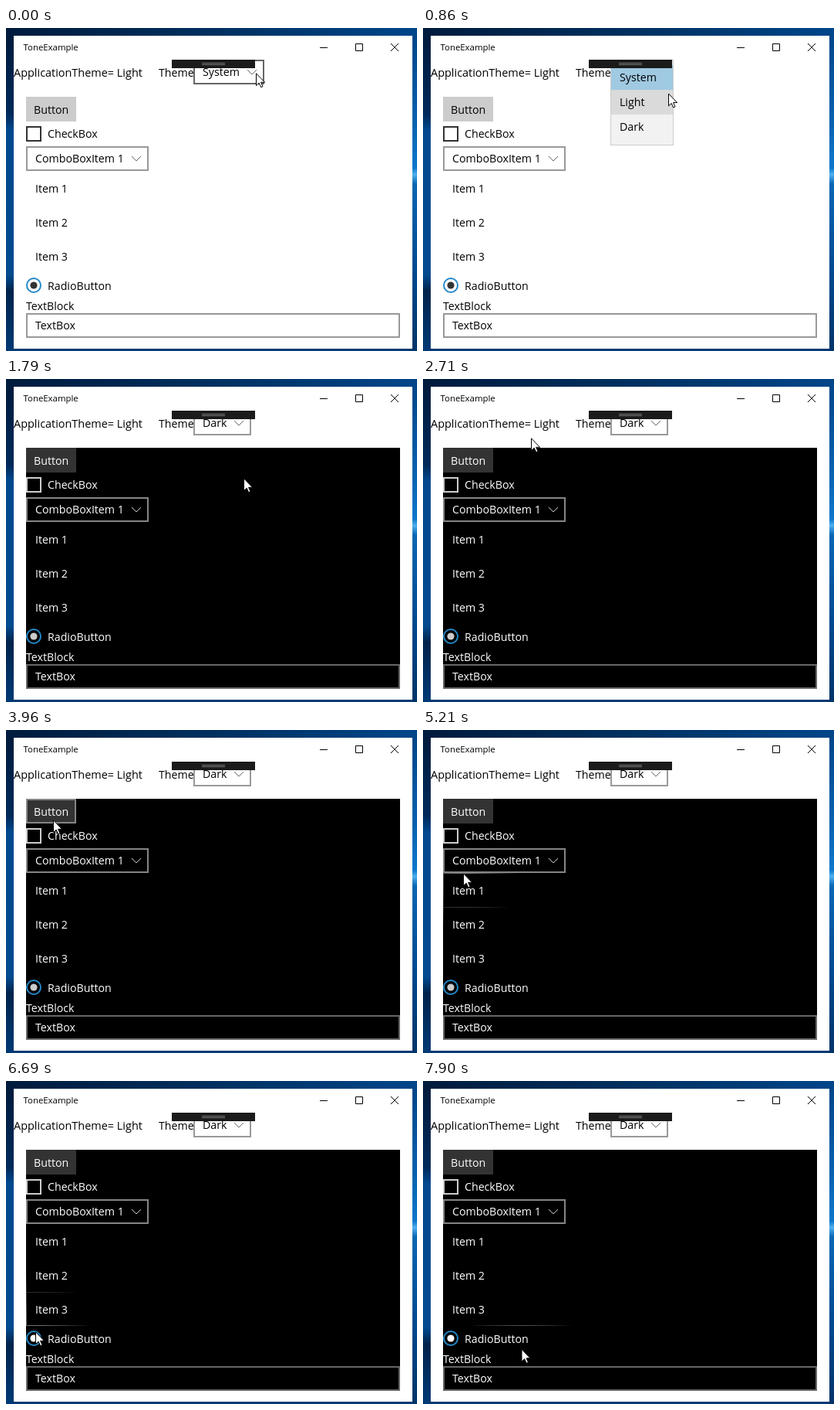
Write an HTML page that moves like this. It is 533 by 418 pixels and loops after 8000 ms.

```html
<!DOCTYPE html>
<html lang="en">
<head>
<meta charset="utf-8">
<title>Theme switch</title>
<style>
  html, body { margin: 0; width: 100%; height: 100%; overflow: hidden; }
  svg { display: block; width: 533px; height: 418px; }
  text { font: 14.2px "Open Sans", "Noto Sans", sans-serif; fill: #000; }
  .header { font-size: 14.45px; }
  .caption { font-size: 11.4px; }
  .line { fill: none; stroke: #000; }
  .box { fill: none; stroke: #999; stroke-width: 2; }
  .chevron { fill: none; stroke: #666; }

  #content { --panel: #fff; --fg: #000; --button: #ccc; --combo: #999; --edge: #999;
             --check: #333; --dot: #333; --chevron: #666; --hot: #666; --strong: #000; }
  #content.dark { --panel: #000; --fg: #fff; --button: #333; --combo: #858585; --edge: #666;
             --check: #ccc; --dot: #ccc; --chevron: #ccc; --hot: #999; --strong: #fff; }
  #content text { fill: var(--fg); }
  #content .chevron { stroke: var(--chevron); }
  #panel { fill: var(--panel); }
  #button { fill: var(--button); }
  #buttonEdge { stroke: none; }
  #buttonEdge.hot { stroke: #858585; }
  #check { stroke: var(--check); }
  #combo { stroke: var(--combo); }
  #textbox { stroke: var(--edge); }
  #combo.hot, #textbox.hot { stroke: var(--hot); }
  #check.hot { stroke: var(--strong); }
  #dot { fill: var(--dot); }
  #dot.hot { fill: var(--strong); }
</style>
</head>
<body>
<svg viewBox="0 0 533 418">
  <defs>
    <linearGradient id="topSky">
      <stop offset="0" stop-color="#001b3d"/><stop offset=".5" stop-color="#00305f"/>
      <stop offset="1" stop-color="#00468a"/>
    </linearGradient>
    <linearGradient id="leftSky" x2="0" y2="1">
      <stop offset="0" stop-color="#001b3d"/><stop offset=".25" stop-color="#002a5a"/>
      <stop offset=".3" stop-color="#00498f"/><stop offset=".76" stop-color="#034a8e"/>
      <stop offset=".81" stop-color="#00234c"/><stop offset="1" stop-color="#003a75"/>
    </linearGradient>
    <linearGradient id="rightSky" x2="0" y2="1">
      <stop offset="0" stop-color="#00468a"/><stop offset=".28" stop-color="#0862b0"/>
      <stop offset=".42" stop-color="#0b78cc"/><stop offset=".44" stop-color="#4fb0ee"/>
      <stop offset=".47" stop-color="#0a66b4"/><stop offset=".75" stop-color="#00498f"/>
      <stop offset="1" stop-color="#003468"/>
    </linearGradient>
    <radialGradient id="edgeLight" gradientUnits="userSpaceOnUse" cx="0" cy="0" r="75">
      <stop id="edgeCore" offset="0" stop-color="#fff" stop-opacity=".5"/>
      <stop id="edgeRim" offset="1" stop-color="#fff" stop-opacity="0"/>
    </radialGradient>
    <radialGradient id="rowLight" gradientUnits="userSpaceOnUse" cx="0" cy="0" r="300">
      <stop offset="0" stop-color="#fff" stop-opacity=".13"/>
      <stop offset=".4" stop-color="#fff" stop-opacity=".09"/>
      <stop offset="1" stop-color="#fff" stop-opacity="0"/>
    </radialGradient>
  </defs>

  <rect width="533" height="418" fill="url(#topSky)"/>
  <rect y="10" width="10" height="408" fill="url(#leftSky)"/>
  <rect x="527" y="10" width="6" height="408" fill="url(#rightSky)"/>
  <rect x="10" y="415" width="517" height="3" fill="#003a75"/>
  <rect x="10" y="10" width="517" height="405" fill="#fff"/>

  <text class="caption" x="22.5" y="29">ToneExample</text>
  <path class="line" d="M407 25.5h10M453.500 20.500h9v9h-9zM499 20l10 10M509 20l-10 10"/>

  <text class="header" x="10" y="63">ApplicationTheme= Light</text>
  <text x="198" y="63">Theme</text>

  <g id="picker">
    <rect id="pickerBox" class="box" x="244" y="42" height="30"/>
    <text id="pickerText" x="255" y="62"></text>
    <path id="pickerChevron" class="chevron" d="M-6 54l6 6l6-6"/>
  </g>

  <g id="content">
    <rect id="panel" x="26" y="89" width="485" height="312"/>
    <rect id="button" x="26" y="89" width="65" height="32"/>
    <rect id="buttonEdge" class="box" x="27" y="90" width="63" height="30"/>
    <text x="36" y="111">Button</text>
    <rect id="check" class="box" x="27" y="128" width="18" height="18"/>
    <text x="54" y="142">CheckBox</text>
    <rect id="combo" class="box" x="27" y="154" width="157" height="30"/>
    <text x="38" y="174">ComboBoxItem 1</text>
    <path class="chevron" d="M163 166l6 6l6-6"/>
    <g id="rowHover">
      <rect x="26" width="485" height="44" fill="#191919"/>
      <rect x="26" width="485" height="44" fill="url(#rowLight)"/>
    </g>
    <path id="rowEdges" fill="none" stroke="url(#edgeLight)"
          d="M26.500 185.500h484v131h-484zM26.500 229.500h484M26.500 273.500h484"/>
    <text x="38" y="213">Item 1</text>
    <text x="38" y="257">Item 2</text>
    <text x="38" y="301">Item 3</text>
    <circle cx="36" cy="333" r="9" fill="none" stroke="#2488c8" stroke-width="2"/>
    <circle id="dot" cx="36" cy="333" r="4.600"/>
    <text x="54" y="339">RadioButton</text>
    <text x="26" y="365">TextBlock</text>
    <rect id="textbox" class="box" x="27" y="370" width="483" height="30"/>
    <text x="38" y="390">TextBox</text>
  </g>

  <g id="popup">
    <rect x="243.500" y="41.500" width="81" height="110" fill="#f2f2f2" stroke="#ccc"/>
    <rect x="244" y="48" width="80" height="32" fill="#a0c9e2"/>
    <rect id="option" x="244" width="80" height="32"/>
    <text x="255" y="69">System</text>
    <text x="255" y="101">Light</text>
    <text id="darkText" y="133">Dark</text>
  </g>

  <rect x="215" y="41" width="108" height="11" fill="#1b1b1b"/>
  <path d="M254 45.500h30M254 47.500h30" stroke="#777"/>

  <path id="cursor" d="M.5.8V16.600L4.200 13.200L6.700 18.700L9 17.700L6.600 12.300H11.600Z"
        fill="#fff" stroke="#000"/>
</svg>
<script>
  const LOOP = 8000, PRESS = 150, OPEN = 300, CHOOSE = 1630, SWITCH = 1790;

  // start, end, steps, then path points as [progress, x, y]
  const moves = [
    [690, 1240, 8, [0, 324, 58], [1, 308, 128]],
    [2260, 2710, 7, [0, 308, 128], [.6, 196, 88], [1, 140, 76]],
    [2950, 3720, 11, [0, 140, 76], [.35, 112, 70], [1, 64, 101]],
    [3800, 4430, 9, [0, 64, 101], [1, 55, 146]],
    [4880, 5670, 11, [0, 55, 146], [5 / 11, 52, 185], [1, 49, 226]],
    [5750, 6150, 6, [0, 49, 226], [5 / 6, 47, 269], [1, 47, 272]],
    [6440, 7220, 11, [0, 47, 272], [4 / 11, 38, 324], [1, 78, 378]],
    [7300, 7760, 7, [0, 78, 378], [1, 127.5, 345.5]],
    [7900, 7900, 1, [0, 127.5, 345.5], [1, 127.5, 346.5]]
  ];

  const $ = id => document.getElementById(id);
  const set = (id, attrs) => {
    for (const name in attrs) $(id).setAttribute(name, attrs[name]);
  };
  const show = (id, on) => set(id, { visibility: on ? "visible" : "hidden" });
  const hot = (id, on) => $(id).classList.toggle("hot", on);

  function pointerAt(t) {
    const move = moves.filter(m => t >= m[0]).pop() || moves[0];
    const [start, end, steps, ...path] = move;
    if (t < start) return path[0].slice(1);
    const gap = (end - start) / (steps - 1) || 1;
    const k = Math.min(steps, Math.floor((t - start) / gap + .15) + 1) / steps;
    const i = Math.max(1, path.findIndex(p => p[0] >= k - 1e-6));
    const [a, b] = [path[i - 1], path[i]];
    const f = (k - a[0]) / (b[0] - a[0]);
    return [a[1] + (b[1] - a[1]) * f, a[2] + (b[2] - a[2]) * f];
  }

  function drawPicker(t, y) {
    const dark = t >= SWITCH, open = t >= OPEN && !dark;
    const pressed = t >= PRESS && t < OPEN;
    const width = dark ? 75 : 92;
    show("picker", !open);
    show("popup", open);
    set("pickerBox", { width: width - 2 });
    $("pickerBox").style.stroke = t < PRESS ? "#666" : "#999";
    $("pickerBox").style.fill = pressed ? "#ccc" : "#fff";
    $("pickerText").textContent = dark ? "Dark" : "System";
    set("pickerChevron", { transform: `translate(${243 + width - 16} 0)` });

    const chosen = t >= CHOOSE;
    show("option", open && y >= 80);
    set("option", {
      x: chosen ? 245 : 244, width: chosen ? 78 : 80,
      y: y < 112 ? 80 : chosen ? 112.5 : 112, height: chosen ? 31 : 32,
      fill: chosen ? "#c2c2c2" : "#dadada"
    });
    set("darkText", { x: chosen ? 256 : 255 });
    $("darkText").style.fontSize = chosen ? "13.8px" : "";
  }

  function drawContent(t, x, y) {
    const dark = t >= SWITCH;
    const over = (left, top, right, bottom) =>
      dark && x >= left && x < right && y >= top && y < bottom;
    $("content").classList.toggle("dark", dark);
    hot("buttonEdge", over(26, 89, 91, 121));
    hot("check", over(26, 122, 146, 152));
    hot("combo", over(26, 153, 185, 184));
    hot("dot", over(26, 317, 146, 349));
    hot("textbox", over(26, 369, 511, 401));

    const row = Math.floor((y - 185) / 44);
    show("rowHover", over(26, 186, 511, 317));
    set("rowHover", { transform: `translate(0 ${185 + row * 44})` });
    set("rowLight", { cx: x, cy: y - 185 - row * 44 });

    show("rowEdges", dark ? y > 150 : t >= 1710);
    set("edgeLight", { cx: x, cy: y });
    for (const id of ["edgeCore", "edgeRim"]) set(id, { "stop-color": dark ? "#fff" : "#000" });
  }

  function draw(t) {
    const [x, y] = pointerAt(t);
    drawPicker(t, y);
    drawContent(t, x, y);
    set("cursor", { transform: `translate(${x} ${y})` });
  }

  const begin = performance.now();
  function tick() {
    draw((performance.now() - begin) % LOOP);
    requestAnimationFrame(tick);
  }
  tick();
</script>
</body>
</html>
```
